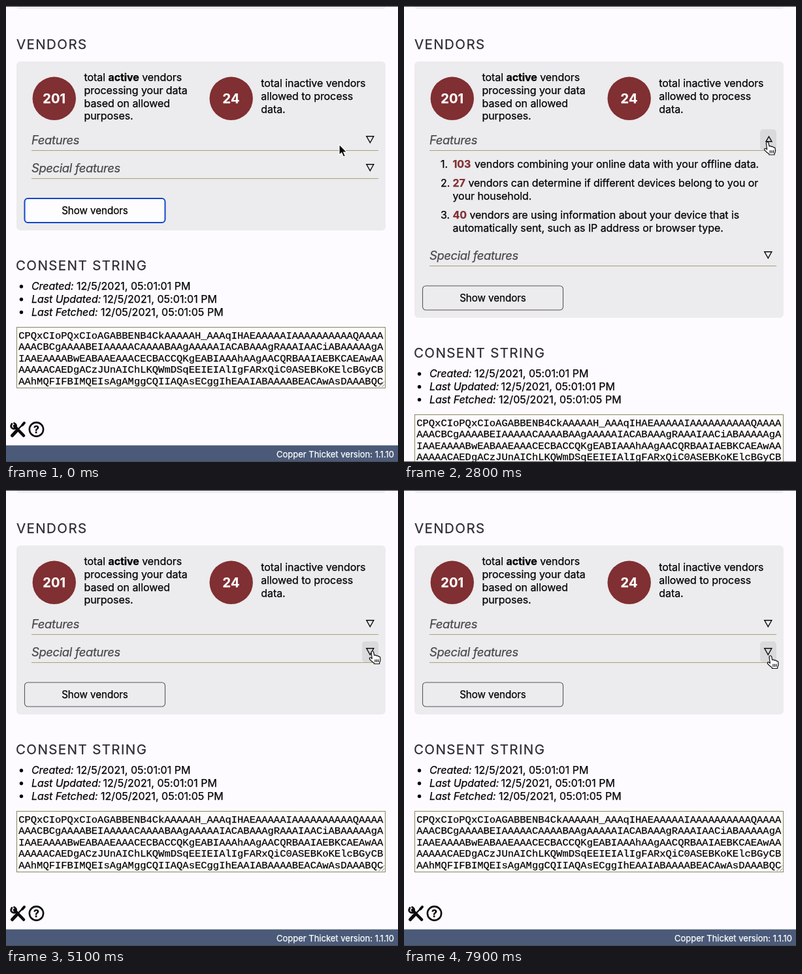
Write an HTML page that moves like this. It is 600 px wide and 699 px high and loops after 8000 ms.

```html
<!DOCTYPE html>
<html lang="en">
<head>
<meta charset="utf-8">
<title>Vendors</title>
<style>
  html, body { margin: 0; width: 100%; height: 100%; overflow: hidden; background: #fdfbff; }
  svg { display: block; width: 600px; height: 699px; overflow: hidden; }
  text {
    font: 16px Inter, "Open Sans", sans-serif; letter-spacing: -0.07px; white-space: pre;
    color: #000; fill: currentColor; stroke: currentColor; stroke-width: 0.25px;
  }
  .head { font-size: 20.5px; letter-spacing: 1.4px; color: #2c2b31; }
  .row { font-size: 18.4px; font-style: italic; letter-spacing: -0.35px; color: #4a494d; }
  .label { font-style: italic; }
  .date { letter-spacing: 0.04px; }
  .big { font-size: 20px; font-weight: 700; letter-spacing: 0.2px; color: #fff; text-anchor: middle; }
  .count { font-weight: 700; color: #802f32; }
  .bold { font-weight: 700; }
  .btn { font-size: 15.2px; text-anchor: middle; }
  .mono { font: 15.5px "Liberation Mono", "DejaVu Sans Mono", monospace; letter-spacing: 0; }
  .foot { font-size: 13px; letter-spacing: 0; color: #fff; text-anchor: end; }
  .help { font-weight: 700; text-anchor: middle; }
  .rule { stroke: #a9a278; }
  .tri { fill: none; stroke: #0b0b0c; stroke-width: 1.4; }
</style>
</head>
<body>
<svg id="stage" viewBox="0 0 600 699"></svg>
<script>
const LOOP = 8000;
const FEATURES_SHIFT = 134, SPECIAL_SHIFT = 153.5;

const text = (x, y, str, cls = "") => `<text x="${x}" y="${y}" class="${cls}">${str}</text>`;
const lines = (x, y, step, list, cls) => list.map((s, i) => text(x, y + i * step, s, cls)).join("");

const circle = (cx, label) =>
  `<circle cx="${cx}" cy="141.8" r="33.2" fill="#802f32"/>` + text(cx, 149, label, "big");

const row = (id, y, title) => `
  ${text(39, y, title, "row")}
  <rect id="${id}Hover" x="545" y="${y - 23}" width="25" height="32" rx="5" fill="#dad9db"/>
  <path class="rule" d="M39 ${y + 9.5}H570"/>
  <path class="tri" id="${id}Down" d="M551.8 ${y - 12.2}h11l-5.5 9.8z"/>
  <path class="tri" id="${id}Up" d="M554 ${y - 4.2}h9l-4.5 -7.6z"/>`;

const item = (n, y, count, x, first, rest = []) =>
  text(56, y, n + ".") + text(74.5, y, count, "count") + text(x, y, first) +
  lines(74.5, y + 19.8, 19.8, rest);

const stamp = (y, label, x, date) =>
  `<circle cx="23.5" cy="${y - 5}" r="2.7"/>` + text(39, y, label, "label") + text(x, y, date, "date");

const consent = [
  "CPQxCIoPQxCIoAGABBENB4CkAAAAAH_AAAqIHAEAAAAAIAAAAAAAAAAQAAAA",
  "AAACBCgAAAABEIAAAAACAAAABAAgAAAAAIACABAAAgRAAAIAACiABAAAAAgA",
  "IAAEAAAABwEABAAEAAACECBACCQKgEABIAAAhAAgAACQRBAAIAEBKCAEAwAA",
  "AAAAACAEDgACzJUnAIChLKQWmDSqEEIEIAlIgFARxQiC0ASEBKoKElcBGyCB",
  "AAhMQFIFBIMQEIsAgAMggCQIIAQAsECggIhEAAIABAAAABEACAwAsDAAABQC"
];

const icons = `
  <g fill="none" stroke="#0b0b0c" stroke-linecap="round">
    <path d="M13 644L27 658.5" stroke-width="4.6"/>
    <path d="M9 640.5q-3 5 1 7 4 1.5 5.5 -2 1 -4 -3 -6" stroke-width="2.8"/>
    <path d="M9.5 658.5L17 650.5" stroke-width="5"/>
    <path d="M17 650.5L26 641" stroke-width="2.4"/>
    <path d="M25 642.5L28 639" stroke-width="4"/>
    <circle cx="46.5" cy="649" r="10.6" stroke-width="2.6"/>
  </g>
  ${text(46.5, 655, "?", "help")}`;

const arrow = `<path id="arrow" fill="#0b0b0c" stroke="#fff" stroke-width="1.2" stroke-linejoin="round"
  d="M0 0V16.5L3.7 13L6.5 19.3L9.4 18L6.7 12H11.8Z"/>`;

const hand = `<g id="hand" stroke="#0b0b0c" stroke-width="1.2" stroke-linejoin="round" stroke-linecap="round">
  <path fill="#fff" d="M-.8 10.5L-2 2.2Q-2.1 .2 -.4 0Q1.2 -.2 1.7 1.7L2.6 6.5Q5 5.4 6 7.2
    Q8.2 6.4 9 8.2Q11.5 7.8 11.8 10.2L12 13.5Q11.8 16 10.6 18V19.5H2.4V18.2Q-1.500 16 -4.400 12.400Q-5.200 10.400 -3.600 9.800Q-2.400 9.600 -.8 11.500z"/>
  <path fill="none" d="M4 13v3.500M6.500 13v3.500M9 13v3.500"/>
</g>`;

const stage = document.getElementById("stage");
stage.innerHTML = `
  <rect width="600" height="699" fill="#fdfbff"/>
  <path d="M16 0H581Q581 4.5 576 4.5H21Q16 4.5 16 0Z" fill="#ecebed"/>
  <rect width="600" height="1" fill="#333236"/>
  ${text(16, 65.5, "VENDORS", "head")}
  <rect id="panel" x="16" y="85" width="565" rx="6" fill="#ecebed"/>
  ${circle(73.8, "201")}
  ${lines(119.5, 115, 19.8, ['total <tspan class="bold">active</tspan> vendors',
    "processing your data", "based on allowed", "purposes."])}
  ${circle(344.7, "24")}
  ${lines(390.3, 124.4, 19.8, ["total inactive vendors", "allowed to process", "data."])}
  ${row("features", 212, "Features")}
  <g id="featuresBody">
    ${item(1, 248, "103", 108, "vendors combining your online data with your offline data.")}
    ${item(2, 277, "27", 98.5, "vendors can determine if different devices belong to you or", ["your household."])}
    ${item(3, 326, "40", 100.5, "vendors are using information about your device that is",
      ["automatically sent, such as IP address or browser type."])}
  </g>
  <g id="specialRow">${row("special", 255, "Special features")}</g>
  <g id="specialBody">
    ${item(1, 291, "0", 89.5, "vendors can collect and process precise geolocation data in",
      ["support of one or more purposes."])}
    ${item(2, 340, "62", 99.5, "vendors can create an identifier using data collected via",
      ["actively scanning a device for specific characteristics (e.g.",
       "installed fonts or screen resolution) then use such an identifier to",
       "re-identify a device."])}
  </g>
  <g id="rest">
    <rect id="button" x="28.5" y="295" width="215" height="37" rx="5"/>
    ${text(136, 318.7, "Show vendors", "btn")}
    ${text(15, 404.5, "CONSENT STRING", "head")}
    ${stamp(435, "Created:", 108, "12/5/2021, 05:01:01 PM")}
    ${stamp(454.8, "Last Updated:", 148.5, "12/5/2021, 05:01:01 PM")}
    ${stamp(474.5, "Last Fetched:", 145, "12/05/2021, 05:01:05 PM")}
    <rect x="16.5" y="492.5" width="564" height="93" fill="#fdfcfb" stroke="#86855f"/>
    ${lines(19.2, 510, 17.4, consent, "mono")}
    <path d="M570.5 584L579 575.5M575.5 584L579 580.5" stroke="#66666a" fill="none"/>
    ${icons}
    <rect y="673.5" width="600" height="26" fill="#4a5a78"/>
    ${text(594, 692, "Copper Thicket version: 1.1.10", "foot")}
  </g>
  <rect y="698" width="600" height="1" fill="#4a4a50"/>
  <g id="cursor">${arrow}${hand}</g>`;

const el = id => document.getElementById(id);
const show = (id, on) => el(id).setAttribute("display", on ? "inline" : "none");
const shift = (id, dy) => el(id).setAttribute("transform", `translate(0 ${dy})`);

// Pointer stops: time, x, y
const stops = [
  [0, 510, 212], [100, 510, 212], [700, 547, 210], [900, 547, 210], [1200, 555, 203],
  [1900, 555, 203], [3000, 556.5, 209], [4350, 556.5, 209], [4900, 561, 247],
  [5450, 561, 247], [5800, 559, 310], [7100, 559, 310], [7500, 561, 254], [LOOP, 561, 254]
];

function pointer(t) {
  const i = stops.findIndex(s => s[0] > t);
  const [t0, x0, y0] = stops[i - 1], [t1, x1, y1] = stops[i];
  const k = (t - t0) / (t1 - t0), e = k * k * (3 - 2 * k);
  return [x0 + (x1 - x0) * e, y0 + (y1 - y0) * e];
}

const between = (v, a, b) => v >= a && v < b;

function draw(t) {
  const featuresOpen = between(t, 1250, 4200);
  const specialOpen = between(t, 5300, 7700);
  const focused = t < 1250;
  const rowShift = featuresOpen ? FEATURES_SHIFT : 0;
  const total = rowShift + (specialOpen ? SPECIAL_SHIFT : 0);

  el("panel").setAttribute("height", 259 + total);
  shift("specialRow", rowShift);
  shift("specialBody", rowShift);
  shift("rest", total);
  show("featuresBody", featuresOpen);
  show("specialBody", specialOpen);
  show("featuresUp", featuresOpen);
  show("featuresDown", !featuresOpen);
  show("specialUp", specialOpen);
  show("specialDown", !specialOpen);

  const button = el("button");
  button.setAttribute("fill", focused ? "#fdfcff" : "#ecebed");
  button.setAttribute("stroke", focused ? "#1147c8" : "#57565a");
  button.setAttribute("stroke-width", focused ? 2 : 1.1);

  const [x, y] = pointer(t);
  const overColumn = between(x, 545, 570);
  const onFeatures = overColumn && between(y, 189, 221);
  const onSpecial = overColumn && between(y, 232 + rowShift, 264 + rowShift);
  show("featuresHover", onFeatures);
  show("specialHover", onSpecial);
  show("hand", onFeatures || onSpecial);
  show("arrow", !onFeatures && !onSpecial);
  el("cursor").setAttribute("transform", `translate(${x} ${y})`);
}

function tick() {
  draw(performance.now() % LOOP);
  requestAnimationFrame(tick);
}
tick();
</script>
</body>
</html>
```
